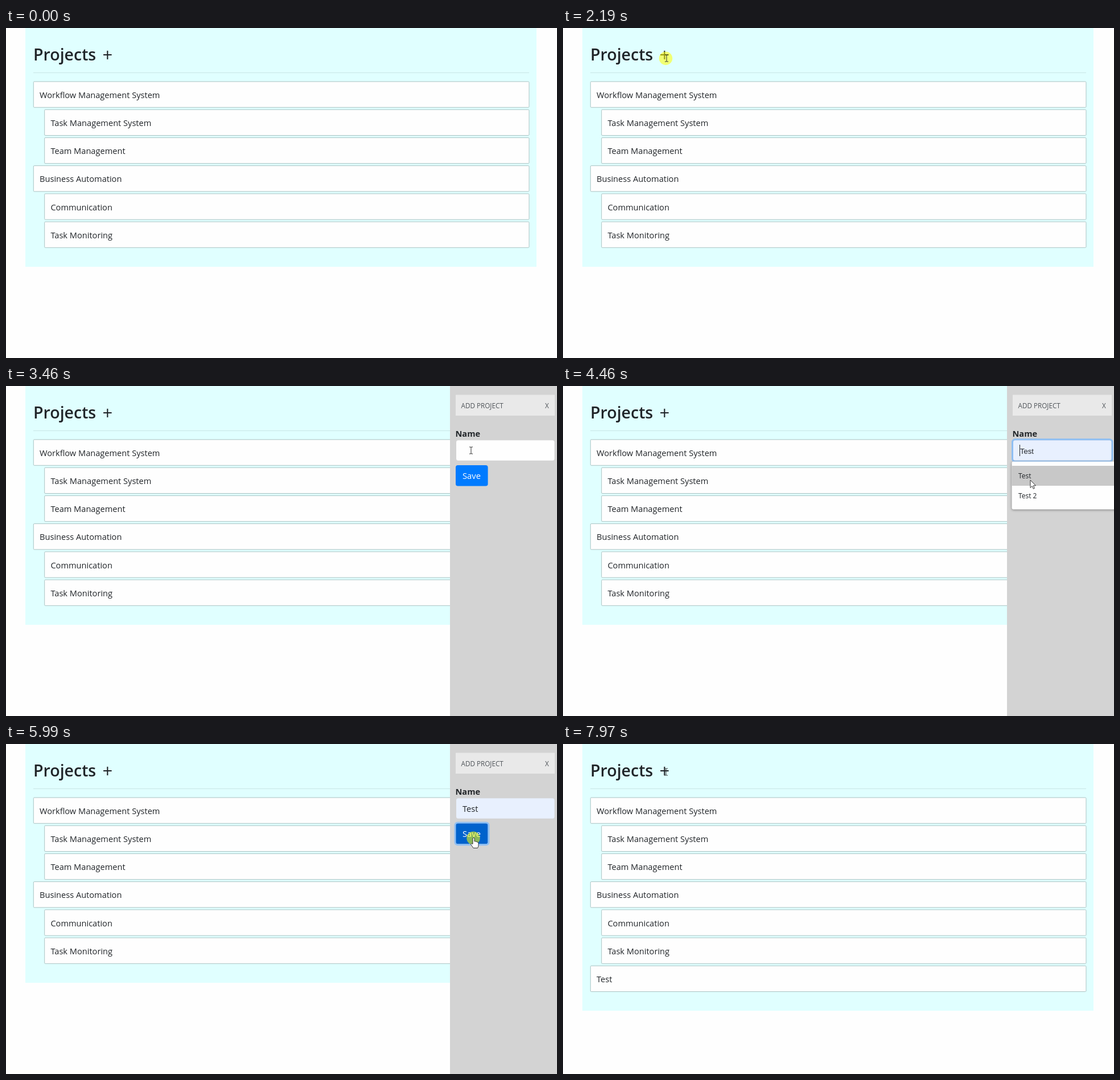
Write an HTML page that moves like this. It is 968 px wide and 579 px high and loops after 8000 ms.

```html
<!DOCTYPE html>
<html lang="en">
<head>
<meta charset="utf-8">
<title>Projects</title>
<style>
  html, body { margin: 0; width: 100%; height: 100%; overflow: hidden; background: #fefefe; }
  svg { display: block; font: 14.6px "Open Sans", "Noto Sans", sans-serif; fill: #212529; }
  .row rect { fill: #fefefe; stroke: #a9c3c3; stroke-width: 1; }
  .bold { font-weight: 700; }
  .head { font-weight: 500; font-size: 11.7px; fill: #50555a; }
  .option { font-weight: 500; font-size: 12px; }
  .ring { fill: none; stroke: #8fbff3; stroke-width: 3; }
  #list { filter: drop-shadow(0 1px 2px rgba(0, 0, 0, .4)); }
  #cursor path { fill: #fff; stroke: #222; stroke-width: .9; stroke-linejoin: round; }
  #cursor #beam { fill: none; stroke: #333; stroke-width: 1; }
</style>
</head>
<body>
<svg width="968" height="579" viewBox="0 0 968 579">
  <rect id="board" x="34" width="898" height="419" fill="#e0ffff"/>
  <text x="48" y="56.5" font-size="28.5" font-weight="600">Projects</text>
  <text x="169.4" y="58.4" font-size="31" font-weight="500">+</text>
  <rect x="48" y="78" width="871" height="1" fill="#c9e6e6"/>
  <g id="rows"></g>

  <g id="panel">
    <rect x="780" width="188" height="579" fill="#d3d3d3"/>
    <rect x="790" y="15.5" width="174" height="36.5" fill="#e9e9e9"/>
    <text class="head" x="799.5" y="38.6">ADD PROJECT</text>
    <text class="head" x="947" y="38.6">X</text>
    <text class="bold" x="789.5" y="89">Name</text>
    <rect id="input" x="791" y="95.3" width="172.5" height="35.4" rx="3.5"/>
    <rect id="inputRing" class="ring" x="789.5" y="93.7" width="175.5" height="38.6" rx="4.5"/>
    <text id="preview" x="803" y="119" font-size="13" font-family="Liberation Sans, Arial, sans-serif">Test</text>
    <text id="value" x="802" y="119">Test</text>
    <rect id="caret" y="103" width="1" height="20"/>
    <rect id="button" x="790" y="139" width="56.6" height="36.6" rx="3.8"/>
    <rect id="buttonRing" class="ring" x="789" y="138" width="59" height="38.8" rx="4.5"/>
    <text x="802" y="163" font-size="14.8" fill="#fff">Save</text>
    <g id="list">
      <rect x="788.5" y="132.5" width="190" height="84" rx="3" fill="#fefefe"/>
      <rect id="hover" x="788.5" y="140" width="190" height="35" fill="#c8c8c8"/>
      <text class="option" x="800" y="161.5">Test</text>
      <text class="option" x="800" y="196.5">Test 2</text>
    </g>
  </g>

  <g id="cursor">
    <circle id="click" cy=".3" r="11.7" fill="#ff0" fill-opacity=".55"/>
    <path id="arrow" d="M0 0V13.5L3.2 10.6L5.3 15.4L7.4 14.5L5.4 9.8H9.5Z"/>
    <path id="beam" d="M-3-6H-1L0-5.4L1-6H3M0-5.4V5.4M-3 6H-1L0 5.4L1 6H3"/>
    <path id="move" d="M0-8.6L3.4-5.3H1.2V-1.2H5.3V-3.4L8.6 0L5.3 3.4V1.2H1.2V5.3H3.4L0 8.6L-3.4 5.3H-1.2V1.2H-5.3V3.4L-8.6 0L-5.3-3.4V-1.2H-1.2V-5.3H-3.4Z"/>
    <path id="hand" d="M-1 10.5V1A1.5 1.5 0 0 1 2 1V6Q3.5 5 4.5 6.5Q6 5.8 7 7.2Q9 6.8 9 9V13Q9 15 7.5 17.5H0Q-1.5 15-4.5 11Q-4 8.5-1 10.5Z"/>
  </g>
</svg>
<script>
const LOOP = 8000, PITCH = 49.2, ROW_TOP = 94, ROW_HEIGHT = 45.3;
const $ = id => document.getElementById(id);
const show = (id, on) => $(id).style.display = on ? '' : 'none';
const within = (v, a, b) => v >= a && v < b;

const projects = [
  ['Workflow Management System', 0], ['Task Management System', 1], ['Team Management', 1],
  ['Business Automation', 0], ['Communication', 1], ['Task Monitoring', 1], ['Test', 0]
];
$('rows').innerHTML = projects.map(([name, level], i) => {
  const x = 48 + level * 19.4, y = ROW_TOP + i * PITCH;
  return `<g class="row" id="row${i}"><rect x="${x + .3}" y="${y}" width="${918.7 - x}" height="${ROW_HEIGHT}" rx="1.5"/>
    <text x="${x + 11}" y="${y + 28.7}">${name}</text></g>`;
}).join('');

// Pointer moves: first step, last step, number of steps, destination
const start = [836, 673];
const moves = [
  [130, 370, 4, 719, 106], [680, 1230, 8, 236, 70], [1460, 1930, 7, 182, 53],
  [2800, 3130, 5, 450, 146], [3210, 3460, 4, 817, 113], [4070, 4460, 6, 821, 165],
  [6470, 6710, 4, 207, 399], [6790, 7010, 4, 188, 296], [7270, 7800, 8, 182, 50],
  [7970, 7970, 1, 181, 49]
];

function pointer(t) {
  let [x, y] = start;
  for (const [from, to, steps, nextX, nextY] of moves) {
    if (t < from) break;
    const interval = (to - from) / (steps - 1) || 1;
    const p = Math.min(1, (Math.floor((t - from) / interval + 1e-6) + 1) / steps);
    x += (nextX - x) * p;
    y += (nextY - y) * p;
  }
  return [x, y];
}

function shape(x, y, panel, list, count) {
  if (panel && x > 780) {
    if (within(y, 95, 131)) return 'beam';
    return !list && within(y, 139, 176) ? 'hand' : 'arrow';
  }
  if (within(x, 48, 190) && within(y, 28, 65)) return 'beam';
  const offset = y - ROW_TOP;
  const onRow = within(offset, 0, count * PITCH) && offset % PITCH < ROW_HEIGHT;
  return onRow && within(x, 48, 919) ? 'move' : 'arrow';
}

function draw(t) {
  const [x, y] = pointer(t);
  const panel = within(t, 2420, 6070);
  const list = within(t, 3900, 5215);
  const saved = t >= 6070;
  const filled = t >= 5140;
  const focused = within(t, 3670, 5850);
  const pressed = t >= 5850;
  const hovering = list && y > 140;
  const kind = shape(x, y, panel, list, saved ? 7 : 6);

  $('board').setAttribute('height', saved ? 468 : 419);
  show('row6', saved);

  show('panel', panel);
  show('inputRing', focused);
  show('preview', hovering && !filled);
  show('value', filled);
  $('input').setAttribute('fill', hovering || filled ? '#e8f0fe' : '#fefefe');
  show('caret', within(t, 3670, 4670) || within(t, 5140, 5680));
  $('caret').setAttribute('x', filled ? 828 : 802);
  $('button').setAttribute('fill', pressed ? '#0062cc' : kind === 'hand' ? '#0069d9' : '#007bff');
  show('buttonRing', pressed);
  show('list', list);
  $('list').style.opacity = filled ? .5 : 1;
  show('hover', hovering);

  $('cursor').setAttribute('transform', `translate(${x} ${y})`);
  for (const id of ['arrow', 'beam', 'move', 'hand']) show(id, id === kind);
  show('click', [[2190, 2420], [3670, 3820], [4910, 5140], [5850, 6070]].some(([a, b]) => within(t, a, b)));
  $('click').setAttribute('cx', t < 2420 ? -1.5 : 0);
}

const origin = performance.now();
function tick() {
  draw((performance.now() - origin) % LOOP);
  requestAnimationFrame(tick);
}
tick();
</script>
</body>
</html>
```
